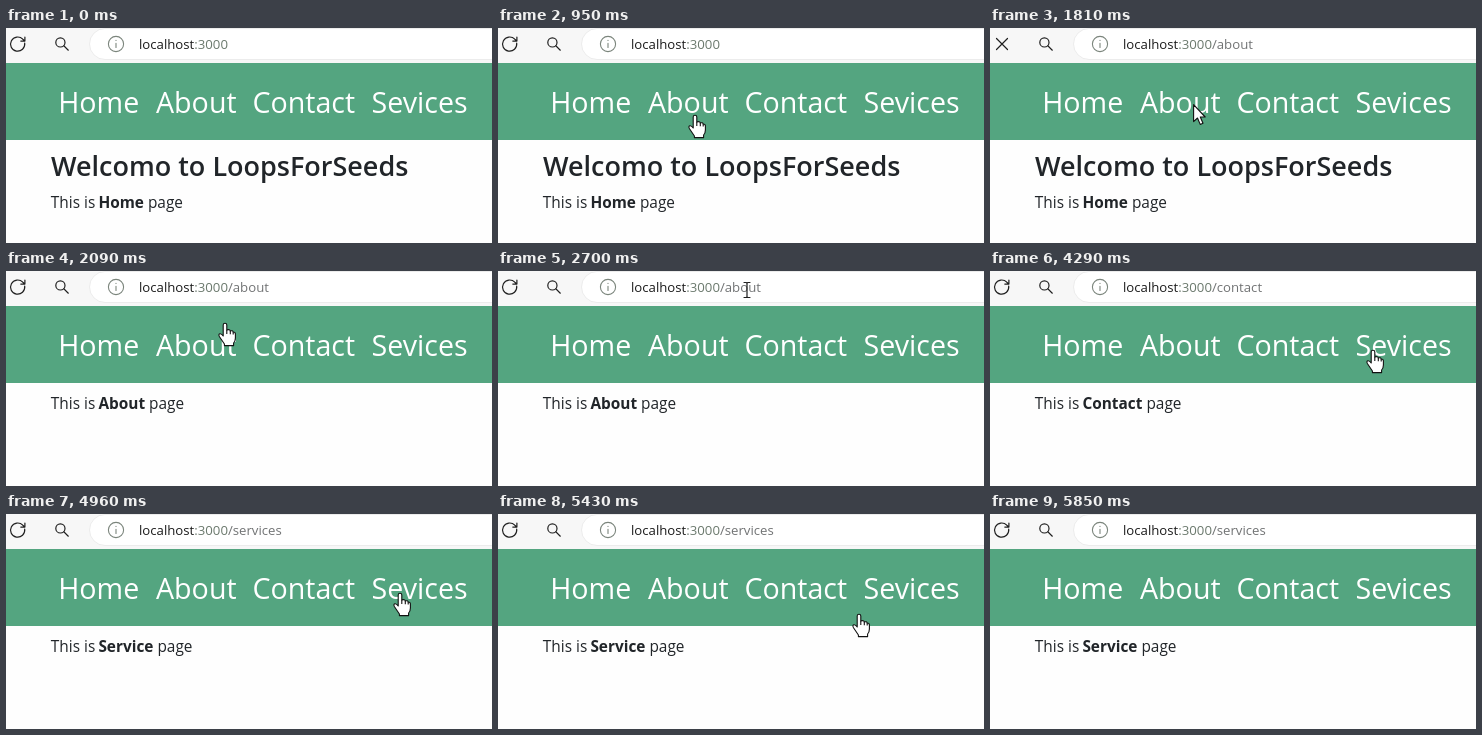
Recreate the animation shown at these times as an HTML page. Size 486 by 215 pixels, loop 6.78 s.

```html
<!DOCTYPE html>
<html lang="en">
<head>
<meta charset="utf-8">
<title>Router demo</title>
<style>
  html, body { margin: 0; width: 100%; height: 100%; overflow: hidden; background: #fefefe; }
  svg { display: block; width: 486px; height: 215px; }
  text { font-family: "Open Sans", "Noto Sans", sans-serif; white-space: pre; }
  .line { fill: none; stroke: #1f1f1f; stroke-width: 1.2; stroke-linecap: round; stroke-linejoin: round; }
  .nav { font-size: 28.6px; fill: #fff; }
  .url { font-size: 13.2px; fill: #1b1b1b; }
  .port { fill: #6c7a6e; }
  .path { fill: #717374; }
  .body { font-size: 15.4px; fill: #212529; }
  .bold { font-weight: 700; }
  .head { font-size: 27px; font-weight: 600; fill: #212529; }
  .shape { fill: #fff; stroke: #111; stroke-width: 1.1; stroke-linejoin: round; }
</style>
</head>
<body>
<svg viewBox="0 0 486 215">
  <rect width="486" height="215" fill="#fefefe"/>
  <rect width="486" height="36" fill="#f7f7f7"/>
  <rect x="83.5" y="0.5" width="430" height="31" rx="15.5" fill="#fff" stroke="#ececec"/>
  <path id="reload" class="line" d="M18.7 15.2A7.1 7.1 0 1 1 16.8 11.2L18.8 13M18.9 9v4.1h-4.1"/>
  <path id="stop" class="line" d="M6.5 10.5l11 11m0-11l-11 11"/>
  <g class="line">
    <circle cx="54.4" cy="14.4" r="4.6"/>
    <path d="M57.8 17.8l4.5 4.4"/>
  </g>
  <g class="line" style="stroke:#7b857c;stroke-width:1.1">
    <circle cx="110" cy="16" r="7.6"/>
    <path d="M110 15.2v4.3M110 12.3v.2"/>
  </g>
  <text class="url" x="133" y="21">localhost<tspan class="port">:3000</tspan><tspan id="path" class="path"></tspan></text>

  <rect y="35" width="486" height="77" fill="#54a580"/>
  <g class="nav">
    <text x="52.2" y="85">Home</text>
    <text x="150" y="85">About</text>
    <text x="246.5" y="85">Contact</text>
    <text x="365.6" y="85">Sevices</text>
  </g>

  <text id="head" class="head" x="45" y="148">Welcomo to LoopsForSeeds</text>
  <text id="body" class="body" x="44.8" y="180">This is <tspan id="word" class="bold" x="92.4"></tspan> page</text>

  <g id="cursor">
    <g id="hand" class="shape">
      <path d="M-.8 2Q-.8 .2 1 .2Q2.8 .2 2.8 2V7Q5.8 6 6.3 8Q8.6 7.2 9.2 9Q11.4 9 11.4 11V15Q11.4 18 9.6 20V22.6H.4V21L-4.5 13.8Q-5.8 11.4 -4.2 10.8Q-2.8 10.3 -.8 13Z"/>
      <path d="M2.8 7v4M6.3 8v3.2M9.2 9v2.6" fill="none"/>
    </g>
    <path id="arrow" class="shape" d="M.6 .6V17.6L4.5 14L7.2 20.4L10 19.2L7.3 13H12.2Z"/>
    <path id="beam" class="line" d="M-3-7.5h2q1 0 1 1V6.5q0 1-1 1h-2M3-7.5H1q-1 0-1 1V6.5q0 1 1 1h2"/>
  </g>
  <circle id="click" r="12" fill="#ff0" fill-opacity="0.47"/>
</svg>
<script>
const LOOP = 6780;
const $ = id => document.getElementById(id);

// Each move: first step, last step, step count, start, end.
const moves = [
  { t0: 330, t1: 950, n: 10, from: [441, 194], to: [196, 87] },
  { t0: 1810, t1: 2420, n: 10, from: [203, 76], to: [240, 19] },
  { t0: 2550, t1: 2700, n: 3, from: [243, 19], to: [249, 19] },
  { t0: 3030, t1: 3230, n: 4, from: [251, 25], to: [275, 78] },
  { t0: 4020, t1: 4360, n: 6, from: [288, 79], to: [393, 79] },
  { t0: 5290, t1: 5783, n: 8, from: [388, 84], to: [249, 164] }
];
const clicks = [[1290, 1480], [3490, 3750], [4560, 4830]];
const pages = [
  { at: 0, word: 'Home' },
  { at: 1880, word: 'About' },
  { at: 3880, word: 'Contact' },
  { at: 4960, word: 'Service' }
];
const paths = [
  { at: 0, text: '' },
  { at: 1480, text: '/about' },
  { at: 3880, text: '/contact' },
  { at: 4960, text: '/services' }
];
const links = [[44, 141], [142, 239], [240, 357], [358, 469]];

const latest = (list, t) => list.filter(e => e.at <= t).pop();
const show = (id, on) => $(id).setAttribute('display', on ? 'inline' : 'none');
const place = (id, [x, y]) => $(id).setAttribute('transform', `translate(${x} ${y})`);
const ease = u => u * u * (3 - 2 * u);

function position(t) {
  const m = moves.filter(e => e.t0 <= t).pop();
  if (!m || t >= 5850) return null;
  const gap = (m.t1 - m.t0) / (m.n - 1);
  const k = Math.min(m.n - 1, Math.floor((t - m.t0) / gap + 0.02));
  const u = ease(k / (m.n - 1));
  return m.from.map((a, i) => Math.round(a + (m.to[i] - a) * u));
}

function kind([x, y], loading) {
  if (y < 32) return 'beam';
  const onLink = y > 44 && y < 104 && links.some(([a, b]) => x >= a && x <= b);
  return onLink && !loading ? 'hand' : 'arrow';
}

function draw(t) {
  const page = latest(pages, t);
  const home = page.word === 'Home';
  $('word').textContent = page.word;
  $('body').setAttribute('y', home ? 180 : 138);
  show('head', home);
  $('path').textContent = latest(paths, t).text;

  const loading = t >= 1480 && t < 1880;
  show('stop', loading);
  show('reload', !loading);

  const pos = position(t);
  show('cursor', pos);
  show('click', pos && clicks.some(([a, b]) => t >= a && t < b));
  if (!pos) return;
  place('cursor', pos);
  place('click', pos);
  const shape = kind(pos, loading && t >= 1810);
  for (const id of ['hand', 'arrow', 'beam']) show(id, id === shape);
}

const start = performance.now();
function tick() {
  draw((performance.now() - start) % LOOP);
  requestAnimationFrame(tick);
}
draw(0);
requestAnimationFrame(tick);
</script>
</body>
</html>
```
